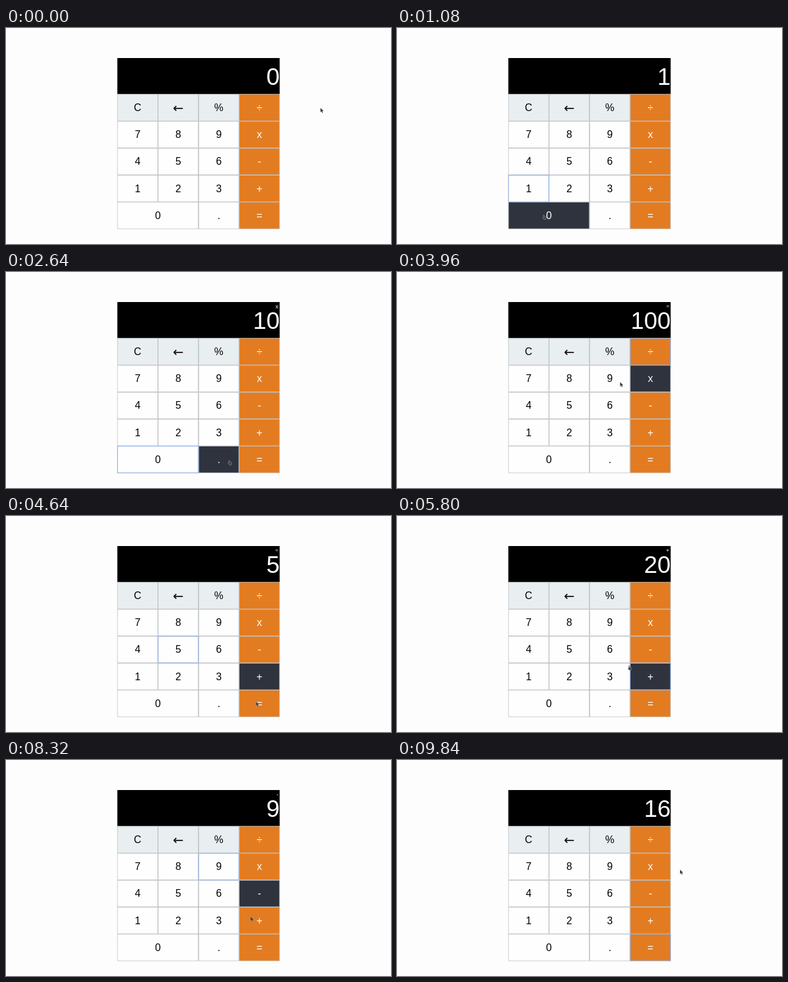
Recreate the animation shown at these times as an HTML page. Size 600 by 338 pixels, loop 9.92 s.

```html
<!DOCTYPE html>
<html lang="en">
<head>
<meta charset="utf-8">
<title>Calculator</title>
<style>
  html, body { margin: 0; width: 100%; height: 100%; overflow: hidden; background: #fdfdfd; }
  svg { display: block; width: 600px; height: 338px; }
  text { font-family: "Liberation Sans", Arial, sans-serif; }
  .key rect { stroke: #b6babc; stroke-width: .7; }
  .key text { font-size: 16px; text-anchor: middle; }
  .key .back { font: 20px "DejaVu Sans", sans-serif; }
  #value { font-size: 37.3px; fill: #fff; text-anchor: end; }
  #sign { font-size: 9px; fill: #fff; text-anchor: end; }
  #ring { fill: none; stroke: #8fb2e8; }
</style>
</head>
<body>
<svg viewBox="0 0 600 338">
  <rect x="173.5" y="47" width="253" height="56.5"/>
  <text id="value" x="426.6" y="88.6"></text>
  <text id="sign" x="424.5" y="57"></text>
  <g id="keys"></g>
  <rect id="ring"/>
  <path id="arrow" d="M0 0V7L1.6 5.6L2.8 8L4.1 7.4L3 5.1H5.2Z" fill="#3c3c3c" stroke="#fff" stroke-opacity=".45" stroke-width=".4"/>
  <path id="hand" d="M1.6 .5Q2.5 -.2 3 .8L3.2 2.7L5.6 3.3Q6.6 3.7 6.4 5L5.6 7.6H2.4L.2 4.7Q.3 3.8 1.9 4.6Z" fill="#45474b" stroke="#c9c9c9" stroke-opacity=".55" stroke-width=".6"/>
</svg>
<script>
const LOOP = 9920, STEP = 40;
const LAG = 60;                 // hover colour trails the pointer
const MOVE = 360, DWELL = 80;   // longest trip, rest around a press
const BOW = 0.09;               // sideways bend of a trip
const LEFT = 173.5, TOP = 103.5, W = 63.25, H = 42.2;
const $ = id => document.getElementById(id);

const setAll = (el, attrs) => {
  for (const k in attrs) el.setAttribute(k, attrs[k]);
  return el;
};
const make = (tag, attrs, parent) => {
  const el = document.createElementNS('http://www.w3.org/2000/svg', tag);
  parent.append(el);
  return setAll(el, attrs);
};
const inset = (b, d) => ({ x: b.x + d, y: b.y + d, width: b.width - 2 * d, height: b.height - 2 * d });

const keys = [];
['C←%÷', '789x', '456-', '123+', '0 .='].forEach((row, r) => [...row].forEach((label, c) => {
  if (label === ' ') return;
  const box = { x: LEFT + c * W, y: TOP + r * H, width: label === '0' ? 2 * W : W, height: H };
  const back = label === '←';
  const g = make('g', { class: 'key' }, $('keys'));
  const rect = make('rect', inset(box, .35), g);
  const text = make('text', {
    x: box.x + box.width / 2, y: box.y + H / 2 + (back ? 7.8 : 5.4), class: back ? 'back' : ''
  }, g);
  text.textContent = label;
  keys.push({
    label, box, rect, text,
    fill: c === 3 ? '#e37c21' : r === 0 ? '#e9eef1' : '#fefefe',
    ink: c === 3 ? '#fff' : '#000'
  });
}));
const find = label => keys.find(k => k.label === label);
const aim = label => {
  const b = find(label).box;
  return [b.x + b.width * .47, b.y + b.height * .53];
};

// The sum that gets typed: time and key of each press
const presses = [
  [720, '1'], [1200, '0'], [1640, 'x'], [2080, '1'], [2320, '0'], [2840, '='],
  [3720, '÷'], [4240, '5'], [4760, '='],
  [5560, '+'], [6125, '5'], [6640, '='],
  [7440, '-'], [7960, '9'], [8544, '=']
];
const stops = [
  [-DWELL, [490, 125]],
  ...presses.map(([t, label]) => [t, aim(label)]),
  [9040, aim('6')], [9480, [441, 171.5]]
];

function pointer(t) {
  const i = stops.findIndex(s => s[0] - DWELL > t);
  if (i < 0) return stops[stops.length - 1][1];
  if (i === 0) return stops[0][1];
  const [t0, [x0, y0]] = stops[i - 1], [t1, [x1, y1]] = stops[i];
  const end = t1 - DWELL, begin = Math.max(t0 + DWELL, end - MOVE);
  const u = Math.max(0, (t - begin) / (end - begin)), s = u * u * (3 - 2 * u);
  const dx = x1 - x0, dy = y1 - y0, bend = BOW * 4 * s * (1 - s);
  return [x0 + dx * s + Math.abs(dy) * bend, y0 + dy * s - dx * Math.sign(dy) * bend];
}

const ops = { x: (a, b) => a * b, '÷': (a, b) => a / b, '+': (a, b) => a + b, '-': (a, b) => a - b };

function calculate(t) {
  let value = '0', sign = '', stored = 0, fresh = true, focus = '';
  for (const [at, label] of presses) {
    if (at > t) break;
    focus = label;
    if (label === '=') {
      value = String(ops[sign](stored, +value));
      sign = '';
      fresh = true;
    } else if (ops[label]) {
      stored = +value;
      sign = label;
      fresh = true;
    } else {
      value = fresh ? label : value + label;
      fresh = false;
    }
  }
  return { value, sign, focus };
}

const keyAt = ([x, y]) => keys.find(({ box: b }) =>
  x >= b.x && x < b.x + b.width && y >= b.y && y < b.y + b.height);
const show = (el, on) => { el.style.display = on ? '' : 'none'; };

function draw(t) {
  const pos = pointer(t), hot = keyAt(pointer(t - LAG));
  for (const k of keys) {
    k.rect.setAttribute('fill', k === hot ? '#2f333e' : k.fill);
    k.text.setAttribute('fill', k === hot ? '#fff' : k.ink);
  }

  const { value, sign, focus } = calculate(t);
  $('value').textContent = value;
  $('sign').textContent = sign;
  show($('ring'), focus);
  if (focus) setAll($('ring'), inset(find(focus).box, .2));

  const onKey = hot && hot === keyAt(pos);
  show($('hand'), onKey);
  show($('arrow'), !onKey);
  $('hand').setAttribute('transform', `translate(${pos[0] - 6} ${pos[1] - .3})`);
  $('arrow').setAttribute('transform', `translate(${pos[0]} ${pos[1]})`);
}

const start = performance.now();
function tick() {
  const t = (performance.now() - start) % LOOP;
  draw(Math.floor(t / STEP) * STEP);
  requestAnimationFrame(tick);
}
tick();
</script>
</body>
</html>
```
